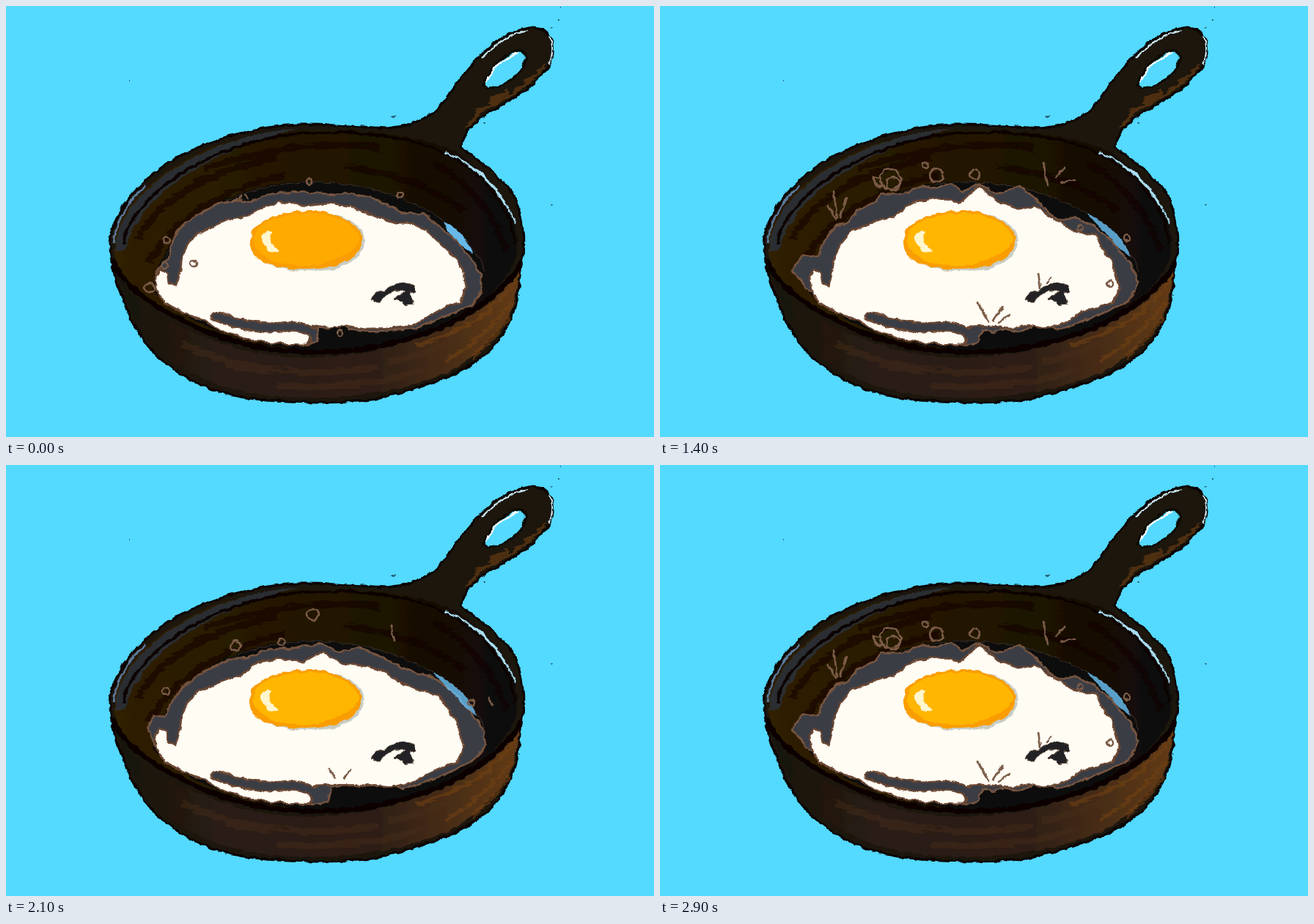
Write an HTML page without scripts that moves like this. It is 884 by 589 pixels and loops after 3000 ms.

```html
<!DOCTYPE html>
<html lang="en">
<head>
<meta charset="utf-8">
<title>Sizzling egg</title>
<style>
html, body { margin: 0; width: 100%; height: 100%; overflow: hidden; background: #54d9ff; }
svg { display: block; width: 884px; height: 589px; }

:root {
  --egg-calm: path("M205 388 205 370 211 360 220 365 222 380 232 381 238 362 240 342 250 322 270 306 300 293 330 287 350 275 375 268 410 272 440 269 470 274 505 288 535 297 558 298 577 310 590 322 610 340 623 360 627 385 620 405 600 411 575 425 555 437 530 440 490 441 465 437 440 440 418 436 412 463 380 462 340 458 300 447 270 430 240 418 215 405Z");
  --egg-warm: path("M205 388 203 372 209 360 218 362 221 381 232 381 239 360 241 340 250 322 268 308 300 295 325 286 340 271 368 266 400 269 432 261 455 273 490 273 515 286 540 302 565 308 588 316 604 335 616 358 623 385 615 408 595 413 575 425 555 435 530 440 500 438 478 436 440 437 420 438 416 464 380 462 340 458 300 447 270 430 240 418 215 405Z");
  --egg-hot: path("M207 388 205 370 210 360 219 364 222 380 230 383 235 362 238 342 246 326 262 307 288 296 318 288 345 268 380 262 410 268 435 246 463 268 490 278 512 273 538 292 570 310 594 312 603 330 617 350 627 388 617 406 597 412 575 417 555 432 530 441 505 436 480 440 440 437 420 438 418 463 380 462 340 458 300 447 270 430 240 418 215 405Z");
  --fat-calm: path("M207 385 206 362 216 350 222 345 228 320 235 305 250 293 268 282 290 270 315 266 333 268 352 260 375 255 400 254 430 256 450 258 470 256 500 262 520 272 545 283 570 284 590 300 615 322 635 345 648 368 648 390 638 408 620 415 590 428 560 440 530 443 495 445 468 441 458 434 440 440 426 440 424 458 412 464 300 440 240 400Z");
  --fat-warm: path("M207 385 200 358 207 344 218 345 228 325 240 305 254 292 270 284 290 275 310 271 330 268 350 258 372 252 385 258 405 243 430 246 450 255 475 251 500 257 530 265 560 275 590 290 615 310 640 340 655 365 656 385 640 402 620 412 590 428 562 437 540 442 515 440 490 432 470 436 455 434 447 440 443 462 418 464 300 440 240 400Z");
  --fat-hot: path("M204 390 180 362 195 340 215 342 226 318 240 300 258 296 268 280 295 268 302 256 330 258 355 246 378 250 396 242 412 254 436 243 460 258 490 246 510 262 530 282 545 294 565 288 592 300 622 328 642 352 652 378 640 404 620 412 595 424 575 432 545 442 515 434 490 446 470 441 455 446 440 442 434 460 418 464 300 440 240 400Z");
}

.intro, .sizzle, .intro *, .sizzle * { animation-delay: -2ms; }
.fat { fill: #3a3d45; stroke: #76543f; stroke-width: 2.6; }
.egg { fill: #fffcf4; stroke: #6b4632; stroke-width: 2.6; }
.marks { fill: none; stroke: #7b5c47; stroke-width: 2.6; stroke-linecap: round; }

.intro { color: #ffaa00; animation: intro 3s step-end infinite; }
.sizzle { color: #ffb600; animation: sizzle 3s step-end infinite; }
@keyframes intro { 0% { opacity: 1 } 16.66%, to { opacity: 0 } }
@keyframes sizzle { 0% { opacity: 0 } 16.66%, to { opacity: 1 } }

.intro .egg { animation: egg-in 3s infinite; }
.intro .fat { animation: fat-in 3s infinite; }
.sizzle .egg { animation: egg-loop .5s steps(5, start) infinite; }
.sizzle .fat { animation: fat-loop .5s steps(5, start) infinite; }
@keyframes egg-in {
  0%, 3.33% { d: var(--egg-calm); animation-timing-function: steps(3) }
  13.33%, to { d: var(--egg-warm) }
}
@keyframes fat-in {
  0%, 3.33% { d: var(--fat-calm); animation-timing-function: steps(3) }
  13.33%, to { d: var(--fat-warm) }
}
@keyframes egg-loop { from { d: var(--egg-warm) } to { d: var(--egg-hot) } }
@keyframes fat-loop { from { d: var(--fat-warm) } to { d: var(--fat-hot) } }

.intro .marks { opacity: 0; animation: once 3s step-end calc(var(--at) * 100ms - 2ms) infinite; }
.intro .first { animation-name: held; }
.sizzle .marks { opacity: 0; animation: flash .5s step-end calc(var(--at) * 100ms - 502ms) infinite; }
@keyframes once { 0% { opacity: 1 } 3.33%, to { opacity: 0 } }
@keyframes held { 0% { opacity: 1 } 6.66%, to { opacity: 0 } }
@keyframes flash { 0% { opacity: 1 } 20%, to { opacity: 0 } }
</style>
</head>
<body>
<svg viewBox="0 0 884 589">
<defs>
  <filter id="rough" x="-5%" y="-5%" width="110%" height="110%">
    <feTurbulence type="fractalNoise" baseFrequency=".09" numOctaves="3" seed="4"/>
    <feDisplacementMap in="SourceGraphic" scale="6" xChannelSelector="R" yChannelSelector="G"/>
  </filter>
  <filter id="brush" x="-5%" y="-5%" width="110%" height="110%">
    <feTurbulence type="fractalNoise" baseFrequency=".04 .2" numOctaves="2" seed="8"/>
    <feDisplacementMap in="SourceGraphic" scale="12" xChannelSelector="R" yChannelSelector="G"/>
  </filter>
  <linearGradient id="wall">
    <stop stop-color="#302005"/><stop offset=".55" stop-color="#211503"/><stop offset="1" stop-color="#0e0b08"/>
  </linearGradient>
  <linearGradient id="front">
    <stop stop-color="#15110d"/><stop offset=".25" stop-color="#2a1d13"/>
    <stop offset=".65" stop-color="#2e1f13"/><stop offset="1" stop-color="#633b19"/>
  </linearGradient>

  <g id="yolk">
    <path fill="#c9ccc2" d="M338 322C340 285 395 278 440 283C476 288 491 309 489 325C484 354 445 364 405 362C362 360 340 350 338 322Z"/>
    <path fill="#fa9d00" d="M333 321C334 291 380 279 420 280C460 282 487 302 486 323C481 351 440 361 401 360C358 358 332 346 333 321Z"/>
    <path fill="currentColor" d="M337 316C344 291 388 282 420 283C459 286 484 304 482 322C470 343 436 350 418 355C385 358 338 347 337 316Z"/>
    <path fill="#fff6cf" d="M349 315Q355 305 362 309Q360 320 365 328L372 335Q362 339 354 330Q348 323 349 315Z"/>
  </g>
  <g id="topping">
    <path fill="#3a3d45" stroke="#6b4632" stroke-width="2.6" d="M425 441Q395 429 375 433Q330 434 292 419Q276 417 281 428Q310 441 350 446Q385 442 410 447Q421 455 414 464"/>
    <path fill="#202325" stroke="#5b4636" d="M498 400 505 391 516 389 530 381 545 379 558 383 560 389 551 391 553 399 556 407 545 410 541 404 529 401 535 395 546 391 538 387 524 392 515 398 510 405 502 405Z"/>
  </g>
</defs>

<rect width="884" height="589" fill="#54d9ff"/>

<g filter="url(#rough)">
  <path fill="#1a130b" stroke="#070605" stroke-width="3" stroke-linejoin="round" d="M141 325C143 285 180 240 225 212C275 182 340 164 400 162C445 161 480 165 520 167C550 165 575 153 587 143C605 122 620 95 645 70C665 50 690 31 720 29C744 30 752 55 742 78C725 108 690 128 665 142C636 157 622 175 621 192C640 210 668 224 690 255C706 282 709 325 703 355L697 400C690 430 680 450 655 475C615 508 550 530 480 540C430 544 355 543 300 530C245 515 205 483 185 453C165 420 152 385 145 355Z"/>
  <path fill="url(#front)" d="M152 362Q165 400 215 425C280 462 350 482 420 480C520 477 620 442 670 397L702 357L693 405C684 438 650 473 610 497C550 526 480 535 410 536C310 534 245 507 205 468C178 438 162 400 152 362Z"/>
  <path fill="url(#wall)" d="M148 325C155 250 270 172 400 170C470 168 540 172 590 190C650 212 697 270 698 325C700 360 660 405 600 438C540 465 470 478 400 472C300 462 200 415 170 385C155 365 147 345 148 325Z"/>
  <path fill="#2b2f32" d="M149 335C150 255 270 177 400 167C315 190 190 235 161 335Z"/>
  <path fill="none" stroke="#5b7899" stroke-width="3" d="M147 325Q150 282 191 245M150 355Q160 380 187 398"/>
  <path fill="none" stroke="#080604" stroke-width="4" d="M160 325C175 250 290 185 400 174C470 170 545 175 595 200C650 224 690 275 694 325"/>
</g>

<g fill="none" filter="url(#brush)">
  <g stroke="#100b03" stroke-width="9" opacity=".55">
    <path d="M180 320Q225 235 370 207M270 222Q400 180 510 194M195 350Q245 265 380 230M460 220Q560 230 625 280M585 215Q660 260 682 335"/>
  </g>
  <g stroke="#714016" stroke-width="5" opacity=".6">
    <path d="M610 447Q665 418 697 373M600 485Q650 456 690 405M560 464Q625 445 660 415M635 480Q670 450 687 425M640 146Q700 120 736 82M628 168Q642 142 684 117"/>
  </g>
  <g stroke="#49301b" stroke-width="9" opacity=".4">
    <path d="M300 490Q420 510 510 493M370 519Q490 525 570 497M240 462Q290 485 350 494M520 486Q580 476 620 450"/>
  </g>
</g>

<g filter="url(#rough)" fill="none">
  <path fill="#0b0a0b" d="M200 390C210 300 310 240 410 240C530 238 640 300 654 372C655 400 600 440 550 455C480 472 420 474 380 466C300 458 240 425 200 390Z"/>
  <path stroke="#070605" stroke-width="7" d="M145 347C165 400 270 450 330 463C420 484 520 470 590 440C650 415 695 375 702 350"/>
  <path stroke="#3f342b" d="M207 375C220 300 310 243 410 241C530 238 638 300 653 365"/>
  <path stroke="#a9ddf0" stroke-width="2" d="M599 200C645 218 680 254 695 298M632 219Q666 244 681 272"/>
  <path stroke="#d3effa" stroke-width="2" d="M650 70Q681 38 713 34M741 41Q750 60 740 80"/>
  <path fill="#54d9ff" stroke="#080706" stroke-width="3" d="M652 109C654 91 676 66 698 61C712 60 711 72 706 83C698 99 672 112 657 112Z"/>
  <path stroke="#fff" stroke-width="2.5" d="M655 104Q666 77 698 64"/>
  <path stroke="#174457" stroke-width="1.5" d="M743 29h2M752 19h3M756 2h2M526 152h5M744 273h2M168 102h1M650 160h3M700 394h2"/>
</g>

<g class="intro" filter="url(#rough)">
  <path class="fat"/>
  <path class="egg"/>
  <use href="#topping"/>
  <use href="#yolk"/>
  <path fill="#67b9e9" d="M597 294Q623 305 637 338Q617 326 605 311Z"/>
  <g class="marks first" style="--at:0">
    <circle cx="414" cy="240" r="4"/><circle cx="538" cy="258" r="4"/><circle cx="220" cy="320" r="4"/>
    <circle cx="256" cy="352" r="4"/><circle cx="196" cy="385" r="7"/><circle cx="217" cy="355" r="4"/>
    <circle cx="455" cy="447" r="4"/><path d="M310 266l5-2M318 264l3-4M326 259l4 4"/>
  </g>
  <g class="marks" style="--at:2">
    <circle cx="415" cy="234" r="8"/><circle cx="537" cy="252" r="6"/><circle cx="220" cy="319" r="5"/>
    <circle cx="256" cy="354" r="4"/><circle cx="326" cy="254" r="4"/><circle cx="459" cy="441" r="7"/>
  </g>
  <g class="marks" style="--at:3">
    <circle cx="416" cy="228" r="12"/><circle cx="536" cy="245" r="8"/><circle cx="220" cy="318" r="6"/>
    <circle cx="255" cy="356" r="5"/><circle cx="327" cy="247" r="5"/><circle cx="463" cy="435" r="11"/>
    <path d="M646 306l6 22"/>
  </g>
  <g class="marks" style="--at:4">
    <path d="M401 212Q415 201 430 213Q437 222 429 234Q411 239 407 228Q399 222 401 212Z"/>
    <circle cx="417" cy="228" r="8"/><ellipse cx="328" cy="241" rx="5" ry="7"/>
    <circle cx="222" cy="316" r="6"/><circle cx="212" cy="326" r="5"/><ellipse cx="255" cy="357" rx="4" ry="6"/>
    <path d="M534 250Q517 234 521 222Q534 224 537 250ZM537 252Q536 236 545 234Q553 241 540 253M545 253Q557 240 559 253"/>
    <path d="M643 297l10 41M662 318l7 10M671 334l7-14M248 282l10 8"/>
    <circle cx="588" cy="333" r="5"/>
    <path d="M451 435Q456 413 478 418Q488 430 476 444Q458 452 451 435Z"/>
  </g>
</g>

<g class="sizzle" filter="url(#rough)">
  <path class="fat"/>
  <path class="egg"/>
  <use href="#topping"/>
  <use href="#yolk" x="-1"/>
  <path fill="#67b9e9" d="M580 282Q625 302 643 342Q619 328 606 308Z" opacity=".85"/>
  <g class="marks" style="--at:0">
    <circle cx="418" cy="214" r="14"/><circle cx="327" cy="235" r="8"/><circle cx="218" cy="313" r="7"/>
    <circle cx="589" cy="329" r="5"/><circle cx="468" cy="427" r="14"/>
    <path d="M529 240l-7-19M542 240l5-14M648 303l7 29M668 326l8-12"/>
  </g>
  <g class="marks" style="--at:1">
    <circle cx="314" cy="247" r="7"/><circle cx="376" cy="242" r="5"/><circle cx="419" cy="204" r="8"/>
    <circle cx="218" cy="309" r="5"/><circle cx="635" cy="325" r="4"/>
    <path d="M450 428l-9-12M462 428l7-12M530 240l-4-21M659 317l5 11"/>
  </g>
  <g class="marks" style="--at:2">
    <circle cx="314" cy="243" r="10"/><circle cx="300" cy="246" r="5"/><circle cx="376" cy="238" r="7"/>
    <circle cx="429" cy="239" r="4"/><circle cx="636" cy="322" r="4"/>
    <path d="M448 430l-11-19M457 429l8-14M529 244l-4-25M545 238l7-10M242 289l-3-18"/>
  </g>
  <g class="marks" style="--at:3">
    <circle cx="314" cy="239" r="12"/><circle cx="298" cy="242" r="7"/><circle cx="377" cy="234" r="8"/>
    <circle cx="363" cy="222" r="3"/><circle cx="429" cy="234" r="6"/><circle cx="637" cy="319" r="4"/>
    <path d="M449 431l-13-22M456 430l10-17M528 244l-4-28M543 235l7-11M241 290l-3-26M248 288l6-17"/>
  </g>
  <g class="marks" style="--at:4">
    <circle cx="314" cy="236" r="14"/><circle cx="318" cy="243" r="9"/><path d="M304 247Q290 245 291 234L302 237"/>
    <circle cx="363" cy="217" r="4"/><circle cx="377" cy="231" r="9"/><circle cx="429" cy="230" r="7"/>
    <path d="M523 213l6 32M540 234l11-13M548 242l17-4M229 272l11 20M237 255l5 35M255 262l-9 26"/>
    <path d="M433 405l16 27M455 430l12-19M462 433l15-11M516 365l3 20M527 378l5-6"/>
    <circle cx="637" cy="317" r="4"/><circle cx="614" cy="380" r="4"/><circle cx="573" cy="304" r="4"/>
  </g>
</g>
</svg>
</body>
</html>
```
